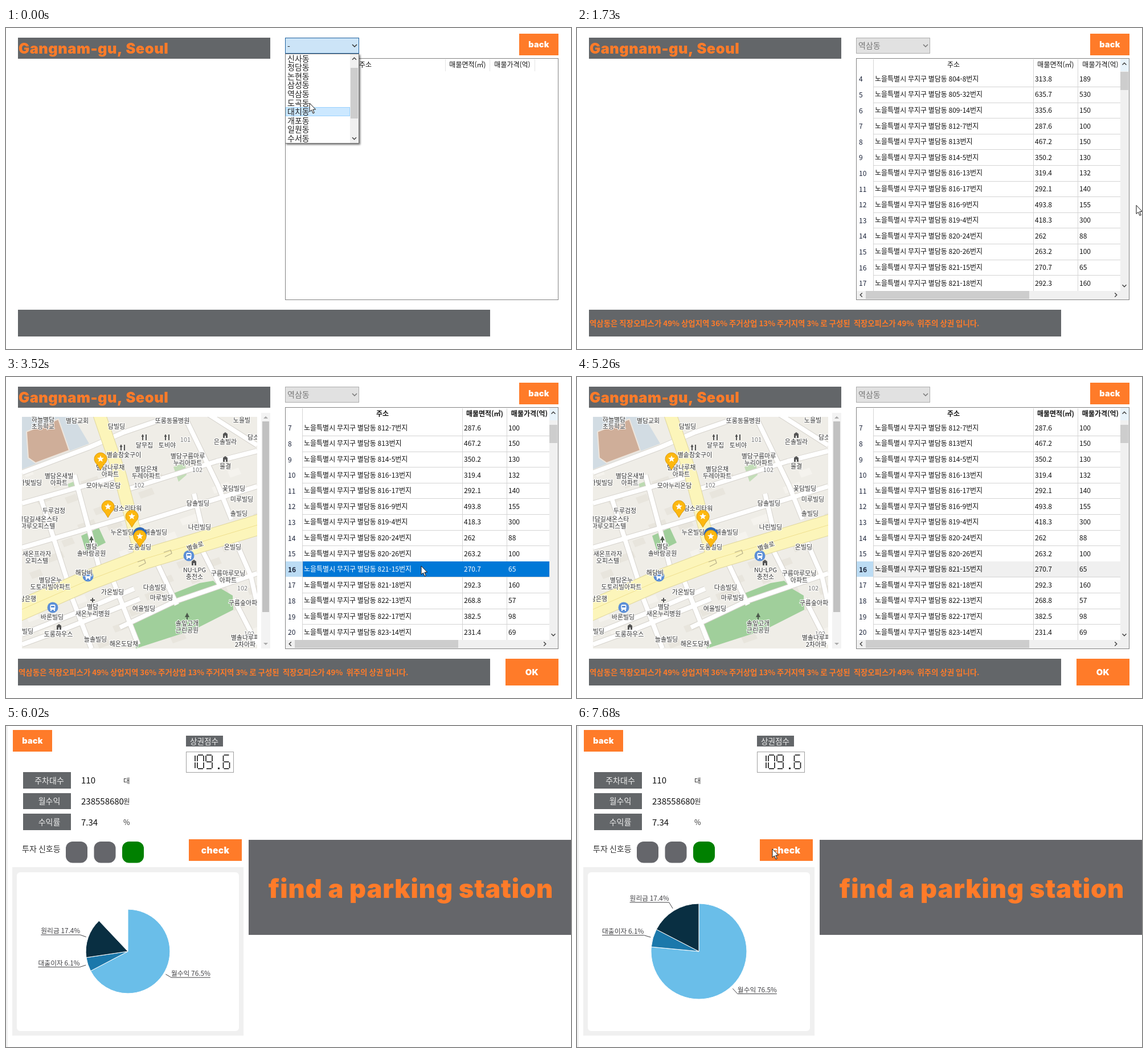
An HTML page with a canvas that plays this animation: 992x564 px, repeating every 8000 ms.

```html
<!DOCTYPE html>
<html lang="ko">
<head>
<meta charset="utf-8">
<style>
html, body { margin: 0; width: 100%; height: 100%; overflow: hidden; background: #fff; }
canvas { display: block; }
</style>
</head>
<body>
<canvas id="stage" width="992" height="564"></canvas>
<script>
const ctx = document.getElementById('stage').getContext('2d');
const LOOP = 8000;
const KOREAN = '"Noto Sans CJK KR", "Noto Sans CJK JP", "Noto Sans CJK", sans-serif';
const HEAVY = 'Inter, "Open Sans", sans-serif';
const ORANGE = '#ff7b29', SLATE = '#636669', TRACK = '#f0f0f0', THUMB = '#cdcdcd';

const districts = '신사동 청담동 논현동 삼성동 역삼동 도곡동 대치동 개포동 일원동 수서동'.split(' ');
const summary = '역삼동은 직장오피스가 49% 상업지역 36% 주거상업 13% 주거지역 3% 로 구성된  직장오피스가 49%  위주의 상권 입니다.';
const lots = `801-27 290.9 250|803-6 400.6 180|804-15 396.3 183|804-8 313.8 189|805-32 635.7 530
|809-14 335.6 150|812-7 287.6 100|813 467.2 150|814-5 350.2 130|816-13 319.4 132|816-17 292.1 140
|816-9 493.8 155|819-4 418.3 300|820-24 262 88|820-26 263.2 100|821-15 270.7 65|821-18 292.3 160
|822-13 268.8 57|822-17 382.5 98|823-14 231.4 69`.split('|').map(row => row.trim().split(' '));

// label, centre x, centre y; "/" starts a second line
const places = `하늘별담/초등학교,65,75|별담교회,125,77|담빌딩,194,87|또롱동물병원,292,77|노을빌,414,76
|달무집,243,120|토비야,283,120|101,315,110|별솥참숯구이,207,137|은솔빌라,385,114|담소,434,106
|별담구름마루/누리아파트,319,139|102,336,163|별담나루채/아파트,183,159|별담은채/두레아파트,246,162
|102,234,190|물결,385,157|별담온새빌/아파트,93,174|가빛빌딩,43,186|모아누리온담,171,191
|담소리타워,213,231|두루검정,84,235|꽃담빌딩,400,196|미루빌딩,414,215|솔빌딩,409,240|담솔빌딩,337,222
|누온빌딩,204,273|해솔빌딩,263,273|나린빌딩,340,264|도롱빌딩,235,299|온빌딩,398,299
|별담길새온스타/마루오피스텔,56,250|별담/솔바람공원,150,298|새온프라자/오피스텔,54,311
|NU-LPG/충전소,331,339|구름마루모닝/아파트,390,345|102,415,371|해담비,137,344
|별담온누/도토리빌아파트,78,357|가온빌딩,187,378|다솜빌딩,261,370|마루빌딩,273,388|여울빌딩,242,407
|별담/새온누리병원,152,404|바론빌딩,81,422|담은행,38,390|빌딩,38,447|도롱하우스,92,452
|늘솔빌딩,157,461|해온도담채,207,469|솔잎고개/근린공원,318,433|102,427,451|별솔나루파/2차아파,420,458
|구름숲아파,416,397`.split('|').map(entry => entry.trim().split(','));

const sideRoads = [
  [28, 168, 145, 124, 205, 98, 310, 62], [28, 222, 205, 172], [28, 300, 220, 244], [228, 258, 441, 192],
  [205, 200, 370, 148, 441, 130], [310, 62, 372, 190, 396, 250], [120, 172, 165, 340], [60, 210, 110, 365],
  [330, 205, 350, 290], [262, 320, 300, 400], [28, 452, 130, 412, 225, 372], [112, 378, 150, 477],
  [185, 350, 232, 470], [200, 440, 295, 395, 441, 345], [340, 295, 375, 365], [350, 62, 441, 120],
  [395, 270, 430, 350, 441, 400], [28, 470, 110, 440, 235, 390], [400, 390, 441, 470]
];

const cursorPath = [
  [0, 533, 132], [60, 533, 132], [330, 532, 115], [860, 532, 115], [920, 526, 90], [1059, 526, 90],
  [1060, 643, 158], [1130, 643, 158], [1200, 700, 200], [1389, 700, 200], [1390, 780, 240], [1530, 780, 240],
  [1700, 982, 310], [1950, 982, 322], [2080, 769, 322], [2130, 769, 322], [2310, 140, 241], [2390, 140, 241],
  [2780, 714, 341], [2860, 700, 331], [3519, 700, 331], [3520, 729, 332], [3590, 729, 332], [4130, 936, 518],
  [7079, 967, 347], [7080, 967, 347], [7380, 320, 270], [7410, 341, 230], [7600, 341, 228], [7680, 343, 216],
  [LOOP, 343, 216]
];

const clamp = v => Math.max(0, Math.min(1, v));

function rect(x1, y1, x2, y2, fill, stroke) {
  if (fill) { ctx.fillStyle = fill; ctx.fillRect(x1, y1, x2 - x1, y2 - y1); }
  if (stroke) {
    ctx.strokeStyle = stroke; ctx.lineWidth = 1;
    ctx.strokeRect(x1 + .5, y1 + .5, x2 - x1 - 1, y2 - y1 - 1);
  }
}

function rounded(x, y, w, h, r, fill) {
  ctx.beginPath(); ctx.roundRect(x, y, w, h, r);
  ctx.fillStyle = fill; ctx.fill();
}

function trace(points) {
  ctx.beginPath();
  for (let i = 0; i < points.length; i += 2) ctx.lineTo(points[i], points[i + 1]);
}

function line(points, color, width = 1) {
  trace(points); ctx.strokeStyle = color; ctx.lineWidth = width; ctx.stroke();
}

function polygon(points, fill) {
  trace(points); ctx.closePath(); ctx.fillStyle = fill; ctx.fill();
}

function disc(x, y, r, fill) {
  ctx.beginPath(); ctx.arc(x, y, r, 0, 7); ctx.fillStyle = fill; ctx.fill();
}

function clipped(x1, y1, x2, y2, draw) {
  ctx.save(); ctx.beginPath(); ctx.rect(x1, y1, x2 - x1, y2 - y1); ctx.clip();
  draw(); ctx.restore();
}

// y is the optical middle of the line
function text(s, x, y, size = 12, color = '#111', align = 'left', weight = 400, family = KOREAN) {
  ctx.font = `${weight} ${size}px ${family}`;
  ctx.textAlign = align; ctx.fillStyle = color;
  ctx.fillText(s, x, y + size * .36);
}

function heavy(s, x, y, size, color, align = 'center') {
  ctx.letterSpacing = size * .02 + 'px';
  text(s, x, y, size, color, align, 900, HEAVY);
  ctx.letterSpacing = '0px';
}

function button(label, x1, y1, x2, y2, size) {
  rect(x1, y1, x2, y2, ORANGE);
  heavy(label, (x1 + x2) / 2, (y1 + y2) / 2, size, '#fff');
}

function chevron(x, y, angle, color = '#444', size = 3.5) {
  ctx.save(); ctx.translate(x, y); ctx.rotate(angle);
  line([-size, size / 2, 0, -size / 2, size, size / 2], color, 1.5);
  ctx.restore();
}

function drawCombo(t) {
  const disabled = t >= 1390, open = t < 600;
  rect(490, 17, 620, 45, disabled ? '#e1e1e1' : open ? '#cce4f7' : '#d0e2f3', disabled ? '#adadad' : '#20629f');
  text(open ? '-' : '역삼동', 494, 31, 14, disabled ? '#777' : '#222');
  chevron(612, 31, Math.PI, disabled ? '#777' : '#333', 4);
}

function drawDropdown(t) {
  ctx.save();
  ctx.shadowColor = 'rgba(0,0,0,.55)'; ctx.shadowBlur = 3; ctx.shadowOffsetX = ctx.shadowOffsetY = 2;
  rect(490, 45, 620, 203, '#fff');
  ctx.restore();
  rect(490, 45, 620, 203, '#fff', '#777');
  const active = t < 130 ? 6 : t < 270 ? 5 : 4;
  const top = Math.round(45.5 + active * 15.6);
  rect(491, top, 604, top + 16, '#cce8ff', '#99d1ff');
  clipped(491, 46, 604, 202, () => districts.forEach((name, i) => text(name, 494, 53.5 + i * 15.6, 14, '#222')));
  rect(604, 46, 619, 202, TRACK);
  rect(605, 70, 618, 159, THUMB);
  chevron(611.5, 54, 0); chevron(611.5, 194, Math.PI);
}

function drawTable(t) {
  const filled = t >= 1060, bars = t >= 1390, picked = t >= 3320, focus = t < 5200;
  const scroll = t < 1600 ? 0 : t < 1760 ? 3 : 6;
  const shift = filled ? 30 : 0;
  const right = bars ? 954 : 969, bottom = bars ? 462 : 476;
  rect(490, 53, 970, 478, '#fff', '#828282');
  clipped(491, 54, right, bottom, () => {
    const weight = picked ? 700 : 400;
    text('주소', 631 + shift, 65, 12, '#111', 'center', weight);
    text('매물면적(㎡)', 810.5 + shift, 65, 12, '#111', 'center', weight);
    text('매물가격(억)', 889 + shift, 65, 12, '#111', 'center', weight);
    [771, 849, 928].forEach(x => rect(x + shift, 55, x + shift + 1, filled ? 476 : 76, filled ? '#d4d4d4' : '#e5e5e5'));
    if (!filled) return;
    rect(520, 55, 521, 476, '#d4d4d4');
    for (let i = 0; i < 15 && i + scroll < lots.length; i++) {
      const index = i + scroll, [lot, area, price] = lots[index];
      const y = 89.5 + i * 27.6, edge = Math.round(y + 13.5);
      const selected = picked && index === 15;
      rect(520, edge, 958, edge + 1, '#d4d4d4');
      if (selected) {
        rect(491, edge - 27, 520, edge, '#bcdcf4');
        rect(521, edge - 27, 958, edge, focus ? '#0078d7' : '#f0f0f0');
        if (!focus) [801, 879].forEach(x => rect(x, edge - 27, x + 1, edge, '#d4d4d4'));
      }
      const color = selected && focus ? '#fff' : '#111';
      text(index + 1, 495, y + .5, 12, '#1a2238', 'left', selected ? 700 : 400);
      text(`노을특별시 무지구 별담동 ${lot}번지`, 523, y, 12, color);
      text(area, 804, y, 12, color);
      text(price, 882, y, 12, color);
    }
  });
  if (!bars) return;
  rect(954, 54, 969, 462, TRACK);
  rect(954, 55, 969, 76, '#e8f3fa');
  const thumb = 70 + scroll * 14 / 6;
  rect(954, thumb, 968, thumb + 32, THUMB);
  chevron(961, 63, 0); chevron(961, 453, Math.PI);
  rect(491, 462, 969, 477, TRACK);
  rect(507, 462, 794, 476, THUMB);
  chevron(499, 469, -Math.PI / 2); chevron(946, 469, Math.PI / 2);
}

function drawPin(x, y) {
  ctx.beginPath();
  ctx.arc(x, y, 11, Math.PI * .82, Math.PI * .18);
  ctx.quadraticCurveTo(x + 5, y + 10, x, y + 19);
  ctx.quadraticCurveTo(x - 5, y + 10, x - 9.3, y + 5.9);
  ctx.closePath();
  ctx.fillStyle = '#fdb80f'; ctx.fill();
  ctx.strokeStyle = '#d99a12'; ctx.lineWidth = 1; ctx.stroke();
  const star = [];
  for (let i = 0; i < 10; i++) {
    const r = i % 2 ? 2.7 : 6.3, a = i * Math.PI / 5;
    star.push(x + r * Math.sin(a), y - r * Math.cos(a));
  }
  polygon(star, '#fff');
}

function drawIcons() {
  [[144, 350], [321, 314], [82, 405]].forEach(([x, y]) => {
    disc(x, y, 9.5, '#5c8fd6');
    rounded(x - 4.5, y - 5, 9, 9, 2, '#fff');
    rect(x - 3, y - 3, x + 3, y, '#5c8fd6');
    rect(x - 4, y + 4, x - 2, y + 6, '#fff'); rect(x + 2, y + 4, x + 4, y + 6, '#fff');
  });
  [[150, 285], [318, 420]].forEach(([x, y]) => {
    polygon([x, y - 6, x + 4, y + 2, x - 4, y + 2], '#4d5b4d');
    rect(x - 1, y + 2, x + 1, y + 6, '#4d5b4d');
  });
  [[205, 124], [243, 106], [283, 106]].forEach(([x, y]) => {
    line([x - 3, y - 5, x - 3, y + 5], '#555', 2);
    line([x + 3, y - 5, x + 3, y + 5], '#555', 2);
    line([x - 5, y - 2, x - 1, y - 2], '#555', 2);
  });
  [[385, 102], [385, 144], [93, 439], [330, 326]].forEach(([x, y]) => {
    polygon([x - 4, y + 5, x - 4, y - 2, x, y - 5, x + 4, y - 2, x + 4, y + 5], '#555');
    rect(x - 1, y + 1, x + 1, y + 5, '#eee');
  });
  line([152, 388, 152, 396], '#555', 2); line([148, 392, 156, 392], '#555', 2);
}

function drawMap(t) {
  rect(448, 63, 464, 477, '#f3f3f3');
  rect(450, 78, 462, 413, '#c1c1c1');
  polygon([452, 73, 456, 69, 460, 73], '#aaa');
  polygon([452, 467, 456, 471, 460, 467], '#aaa');
  clipped(28, 70, 441, 477, () => {
    ctx.lineJoin = 'round';
    rect(28, 70, 441, 477, '#efede7');
    for (let i = 0; i < 46; i++) {
      const x = 30 + i * 73 % 410, y = 165 + i * 47 % 310, w = 14 + i % 4 * 5;
      polygon([x, y, x + w, y - w * .35, x + w + 5, y + 11 - w * .35, x + 5, y + 11], i % 3 ? '#e8e5dd' : '#f5f3ee');
    }
    polygon([28, 70, 118, 70, 146, 117, 28, 162], '#d2dce3');
    polygon([36, 96, 92, 74, 111, 129, 52, 151, 39, 142], '#cfae99');
    line([36, 96, 92, 74, 111, 129, 52, 151, 39, 142, 36, 96], '#eee6dd', 2);
    polygon([132, 279, 163, 265, 175, 291, 141, 308], '#a0cf9b');
    polygon([294, 158, 314, 150, 317, 172, 303, 184], '#c3ddb8');
    polygon([108, 188, 124, 182, 127, 191, 111, 197], '#bcdab2');
    polygon([222, 430, 288, 396, 289, 382, 340, 362, 364, 358, 376, 371, 398, 384, 399, 409, 330, 444, 228, 477], '#a0cf9b');
    sideRoads.forEach(road => line(road, '#d6d3cd', 10));
    sideRoads.forEach(road => line(road, '#fff', 8));
    const avenue = [160, 55, 200, 172, 238, 318], street = [15, 414, 140, 359, 245, 319, 455, 256];
    line(avenue, '#e0d79e', 23); line(street, '#e0d79e', 37);
    line(avenue, '#fcf5ba', 21); line(street, '#fcf5ba', 35);
    line(street, '#efe08f', 1);
    [[240, 328], [286, 311]].forEach(([x, y]) => {
      line([x - 9, y - 3, x + 3, y - 7, x + 5, y - 1, x - 7, y + 5], '#b9b18a', 1.3);
    });
    drawIcons();
    ctx.lineWidth = 2.5;
    const label = (s, x, y) => {
      ctx.font = `400 11px ${KOREAN}`; ctx.textAlign = 'center';
      ctx.strokeStyle = 'rgba(255,255,255,.85)'; ctx.strokeText(s, x, y + 4);
      text(s, x, y, 11, /^10\d$/.test(s) ? '#777' : '#333', 'center');
    };
    places.forEach(([name, x, y]) => name.split('/').forEach((part, i) => label(part, +x, +y + i * 12)));
    ctx.save(); ctx.translate(332, 297); ctx.rotate(-.3); label('별솔로', 0, 0); ctx.restore();

    const veil = clamp((2230 - t) / 300);
    ctx.fillStyle = `rgba(245,243,238,${veil})`;
    ctx.fillRect(28, 70, 338, 177);
    ctx.fillRect(28, 247, 413, 230);
    ctx.fillStyle = `rgba(245,243,238,${clamp((2060 - t) / 200)})`;
    ctx.fillRect(366, 70, 75, 177);

    disc(235, 276, 12, '#2e68b8');
    [[166, 144], [179, 228], [221, 245], [235, 280]].forEach(([x, y]) => drawPin(x, y));
  });
}

function drawSearch(t) {
  rect(21, 17, 464, 54, SLATE);
  heavy('Gangnam-gu, Seoul', 22, 36, 25.4, ORANGE, 'left');
  button('back', 901, 10, 970, 48, 14.4);
  rect(21, 495, 850, 542, SLATE);
  if (t >= 1060) text(summary, 22, 519, 13.4, ORANGE, 'left', 700);
  drawTable(t);
  drawCombo(t);
  if (t < 600) drawDropdown(t);
  if (t >= 1850) drawMap(t);
  if (t >= 3320) button('OK', 877, 495, 970, 542, 14.8);
}

const segments = { a: [1, 0, 10, 0], b: [11, 1, 11, 11], c: [11, 13, 11, 23], d: [1, 24, 10, 24],
  e: [0, 13, 0, 23], f: [0, 1, 0, 11], g: [1, 12, 10, 12] };

function drawScore() {
  rect(316, 45, 400, 82, '#fff', '#a0a0a0');
  [[321, 'bc'], [336, 'abcdef'], [351, 'abcdfg'], [381.5, 'acdefg']].forEach(([x, lit]) => {
    ctx.save(); ctx.translate(x, 51);
    for (const s of lit) line(segments[s], '#222', 1.7);
    ctx.restore();
  });
  rect(372, 73, 375, 76, '#222');
}

function drawPie(t) {
  const grow = 1 - (1 - clamp((t - 5610) / 1000)) ** 4;
  if (!grow) return;
  const cx = 214, cy = 396, r = 84 * grow, turn = Math.PI * 2 * grow;
  let from = 0;
  [['월수익', 76.5, '#6abee9'], ['대출이자', 6.1, '#1b78ab'], ['원리금', 17.4, '#092f42']].forEach(([name, share, color]) => {
    const to = from + share / 100 * turn, mid = (from + to) / 2;
    ctx.beginPath(); ctx.moveTo(cx, cy);
    ctx.arc(cx, cy, r, from - Math.PI / 2, to - Math.PI / 2); ctx.closePath();
    ctx.fillStyle = color; ctx.fill();
    ctx.strokeStyle = '#fff'; ctx.lineWidth = 1; ctx.stroke();
    const dx = Math.sin(mid), dy = -Math.cos(mid), side = dx > 0 ? 1 : -1;
    const x = cx + dx * r * 1.2, y = cy + dy * r * 1.2;
    const caption = `${name} ${share}%`;
    text(caption, x, y - 7, 11.8, '#404044', side > 0 ? 'left' : 'right');
    line([cx + dx * r * 1.05, cy + dy * r * 1.05, x, y, x + side * ctx.measureText(caption).width, y], '#404044');
    from = to;
  });
}

function drawReport(t) {
  rect(0, 0, 3, 564, TRACK);
  button('back', 12, 7, 81, 45, 14.4);
  rect(316, 17, 381, 36, SLATE);
  text('상권점수', 348, 27, 13.6, '#eee', 'center');
  drawScore();
  [['주차대수', '110', '대'], ['월수익', '238558680', '원'], ['수익률', '7.34', '%']].forEach(([name, value, unit], i) => {
    const y = 95.5 + i * 36.6;
    rect(30, Math.round(y - 14.5), 114, Math.round(y + 14), SLATE);
    text(name, 76, y, 14, '#eee', 'center');
    text(value, 132, y + .5, 15);
    text(unit, 206, y + .5, 12.5, '#333');
  });
  text('투자 신호등', 28, 216, 14, '#333');
  [105, 154.5, 204].forEach((x, i) => rounded(x, 203, 38, 37.5, 12, i === 2 ? '#008000' : '#65666b'));
  button('check', 321, 199, 414, 237, 15.6);
  rect(426, 200, 992, 367, '#65666a');
  heavy('find a parking station', 711, 286, 45, ORANGE);
  rect(11, 248, 417, 544, TRACK);
  rounded(19, 257, 390, 279, 6, '#fff');
  drawPie(t);
}

function drawCursor(t) {
  if (t >= 5260 && t < 7080) return;
  const next = Math.max(1, cursorPath.findIndex(key => key[0] > t));
  const [t0, x0, y0] = t >= 4130 && t < 5260 ? [0, 936, 518] : cursorPath[next - 1];
  const [t1, x1, y1] = t >= 4130 && t < 5260 ? [LOOP, 936, 518] : cursorPath[next];
  const k = (t - t0) / (t1 - t0), x = x0 + (x1 - x0) * k, y = y0 + (y1 - y0) * k;
  if ((t >= 3050 && t < 3110) || (t >= 5060 && t < 5200)) disc(x, y + 1, 11, 'rgba(255,255,0,.4)');
  ctx.save(); ctx.translate(x, y);
  polygon([0, 0, 0, 15, 3.5, 12, 6, 18, 8.3, 17, 5.8, 11.2, 10.5, 11], '#fff');
  ctx.closePath(); ctx.strokeStyle = '#111'; ctx.lineWidth = 1; ctx.stroke();
  ctx.restore();
}

function frame(now) {
  const t = now % LOOP;
  rect(0, 0, 992, 564, '#fff');
  if (t < 5400) drawSearch(t); else drawReport(t);
  drawCursor(t);
  requestAnimationFrame(frame);
}
requestAnimationFrame(frame);
</script>
</body>
</html>
```
